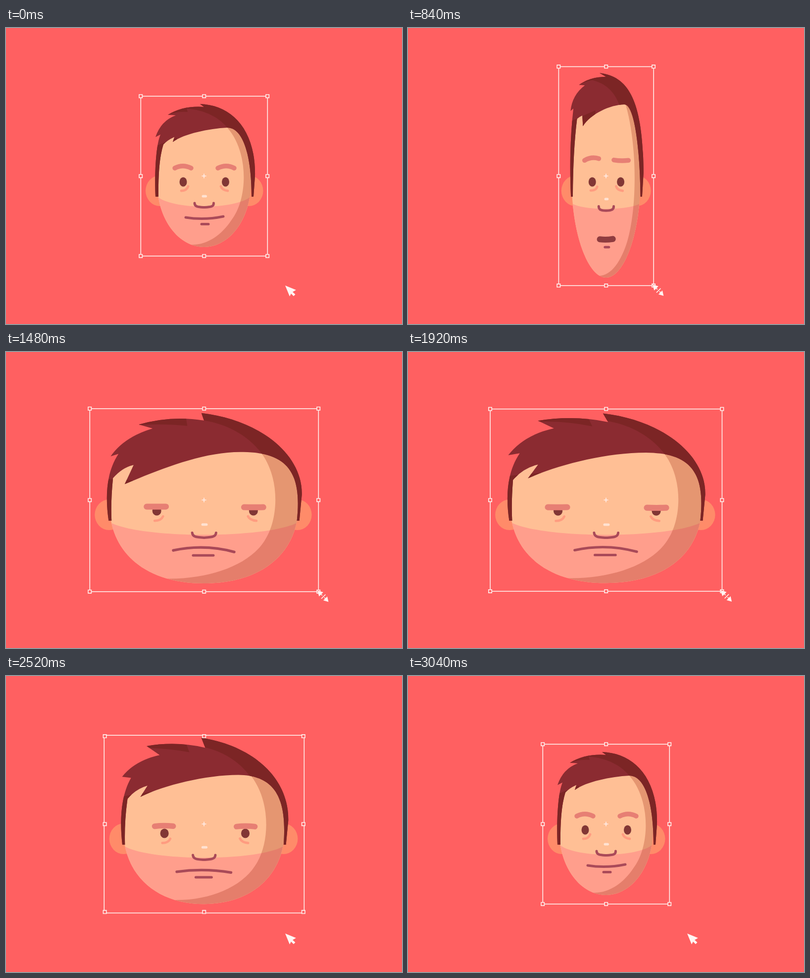
Animation, 800 px wide and 600 px high, one loop 3.08 s. Source, as an HTML page:

```html
<!DOCTYPE html>
<html lang="en">
<head>
<meta charset="utf-8">
<title>Face resize</title>
<style>
  html, body { margin: 0; width: 100%; height: 100%; overflow: hidden; background: #ff6061; }
  svg { display: block; width: 100vw; height: 100vh; }
  .line { fill: none; stroke-linecap: round; stroke-linejoin: round; }
  .feature { stroke: #aa4a59; stroke-width: 5; }
  .white { fill: none; stroke: #fff1ee; stroke-width: 1.6; }
  .solid { fill: #fff4f2; }
</style>
</head>
<body>
<svg viewBox="0 0 800 600">
  <defs>
    <clipPath id="inFace"><path class="face"/></clipPath>
    <clipPath id="inHair"><path class="hair"/></clipPath>
  </defs>
  <rect width="800" height="600" fill="#ff6061"/>
  <g fill="#ff8b69">
    <ellipse class="earL" cy="330" rx="29" ry="31"/>
    <ellipse class="earR" cy="330" rx="29" ry="31"/>
  </g>
  <path class="face" fill="#ffbf95"/>
  <g clip-path="url(#inFace)">
    <path class="beard" fill="#ff9e8c"/>
    <path class="shade" fill="#a8361f" fill-opacity=".3"/>
  </g>
  <path class="bags line" stroke="#ff9c80" stroke-width="4.8"/>
  <g fill="#823735">
    <ellipse class="eyeL eye"/>
    <ellipse class="eyeR eye"/>
  </g>
  <path class="brows line" stroke="#e77f74"/>
  <path class="glint line" stroke="#ffe2d2" stroke-width="5"/>
  <path class="nose line feature"/>
  <path class="mouth line"/>
  <path class="chin line feature"/>
  <path class="hair" fill="#8b2b31"/>
  <g clip-path="url(#inHair)" fill="#7c2525">
    <path class="crown"/>
    <path class="tuft"/>
    <path class="side"/>
  </g>
  <rect id="box" class="white"/>
  <g id="handles"></g>
  <path class="white" d="M395.5 300h9M400 295.5v9"/>
  <g id="cursor">
    <path id="arrow" class="solid" d="M0 0L22 9 15 13 20.5 18 17 21.5 12 16.5 9 22Z"/>
    <g id="resize">
      <path class="solid" d="M0 0L12 3.5 3.5 12ZM22.5 23L20 12 12 20Z"/>
      <path class="white" d="M8 16.5L16.5 8M7 7L10 10M14 14L17 17"/>
    </g>
  </g>
</svg>
<script>
const LOOP = 3080;
const $ = id => document.getElementById(id);

const face = (l, yb, xb, b, yt, xt, t) => {
  const r = 800 - l;
  return `M${l} 310C${l} ${yb} ${xb} ${b} 400 ${b}C${800 - xb} ${b} ${r} ${yb} ${r} 310` +
    `C${r} ${yt} ${800 - xt} ${t} 400 ${t}C${xt} ${t} ${l} ${yt} ${l} 310Z`;
};
const beard = (l, y, x, dip) =>
  `M${l} ${y}C${x} ${dip} ${800 - x} ${dip} ${800 - l} ${y}L${800 - l} 600L${l} 600Z`;
const shade = (curve, x) => `M${curve}L${x} 600L700 600L700 100Z`;
const crown = (x, y, curve, endX) => `M${x} ${y}C${curve}L${endX} 350L700 350L700 0L${x} 0Z`;
const side = (x, y, x2, y2) => `M${x} ${y}L${x2} ${y2}L${x2} 350L${x} 350Z`;

// Poses: normal, tall, wide, rebound (hair thrown up), drop (hair thrown down).
// A value left out is taken from the pose given here.
const fallback = [0, 0, 0, 0, 2];

// Each entry: class, attribute, then its value in the poses.
const parts = [
  ['earL', 'cx', '311', '350', '208', '308'],
  ['earR', 'cx', '490.5', '450', '589', '493'],
  ['face', 'd',
    face(305, 390, 350, 444, 200, 320, 195),
    face(341, 430, 370, 531, 140, 352, 120),
    face(209, 405, 282, 466, 210, 240, 195),
    face(303, 390, 349, 447, 195, 319, 188)],
  ['beard', 'd', beard(305, 341, 335, 369), beard(341, 361, 360, 371),
    beard(209, 344, 270, 379), beard(303, 342, 333, 370)],
  ['shade', 'd',
    shade('447 202C490 250 490 345 455 390C435 420 405 442 370 439', 370),
    shade('437 137C452 230 453 370 438 450C430 490 415 527 390 528', 390),
    shade('517 209C555 260 551 340 522 381C490 431 405 460 315 456', 315),
    shade('445 195C491 248 492 346 456 392C435 422 405 445 370 442', 370)],
  ['bags', 'd',
    'M354 330Q365 330 368 321M434 321Q437 329 448 330',
    'M375 329Q386 330 388 322M415 321Q417 329 428 330',
    'M300 342Q313 342 317 333M489 333Q493 341 506 342',
    'M353 330Q364 330 367 322M434 321Q437 329 449 330'],
  ['eyeL', 'cx', '358', '378', '304.5', '357'],
  ['eyeR', 'cx', '443.5', '424', '500', '444.5'],
  ['eye', 'cy', '312', '312', '322'],
  ['eye', 'rx', '7.5', '7.5', '9'],
  ['brows', 'd',
    'M341 284Q357 275.5 374 284M428 284Q445 275.5 461 284',
    'M363 262Q376 254 390 257M411 261Q425 268 439 262',
    'M284 314Q303 314 323 314M481 315Q500 315 520 315',
    'M339 283Q356 275 373 283M429 283Q446 275 462 283'],
  ['brows', 'stroke-width', '9.5', '9.5', '12'],
  ['glint', 'd', 'M398 341L403.5 341', 'M399.5 349L402.5 349', 'M397 349.5L405 349.5'],
  ['nose', 'd',
    'M381 355C381 363 390 363 400 363.5C411 363 420 363 419.5 355',
    'M387 364C387 372 393 373 400 373C407 373 414 372 414 364',
    'M376 366C377 375 385 375 400 376C414 375 424 375 424.5 366'],
  ['nose', 'stroke-width', '5', '5', '6'],
  ['mouth', 'd', 'M363 384Q400 390 439 382', 'M397.5 446Q400 446 403.5 446',
    'M337 400Q400 387 462 403', 'M362 385Q400 391 439 383'],
  ['mouth', 'stroke-width', '5', '15', '5'],
  ['mouth', 'stroke', 'rgb(170,74,89)', 'rgb(132,55,53)', 'rgb(170,74,89)'],
  ['chin', 'd', 'M395 397.5L409 397.5', 'M399 463L404.5 463', 'M378 410L419 410', 'M396 399L407 399'],
  ['hair', 'd',
    'M302 342C300 300 302 240 312 216L302 221Q313 188 343 177L327 176Q358 157 400 160L392 154' +
      'C455 156 505 205 503 300L500 342L496 342C496 255 478 202 447 202' +
      'C410 204 360 214 337 231L340 221Q325 228 318 236Q307 270 308 342Z',
    'M340 342C337 270 338 210 343 142L339 147Q339 115 363 92L353 91Q370 76 400 74L385 66' +
      'C450 75 462 140 465 290L462 342L459 342C458 260 452 136 433 136' +
      'C408 136 372 158 360 186L357 160Q354 161 351 163Q344 240 343 342Z',
    'M207 342C200 295 202 245 228 207L205 211Q236 170 296 157L264 142Q335 130 404 144L394 127' +
      'C510 140 600 208 598 290L593 342L588 342C598 248 572 206 480 205' +
      'C400 205 305 229 245 256L265 229Q235 236 215 260Q211 305 213 342Z',
    'M301 342C299 290 302 240 311 211L304 196Q318 180 344 174L331 151Q362 143 399 155L396 130' +
      'C440 145 505 185 505 300L501 342L497 342C496 250 480 196 445 195' +
      'C410 196 360 206 335 222L336 211Q325 218 318 228Q305 270 305 342Z',
    'M207 342C200 295 202 245 227 209L211 214Q238 175 296 158L268 150Q335 131 400 142L395 127' +
      'C510 140 600 208 598 290L593 342L588 342C598 248 572 206 480 205' +
      'C400 203 310 240 240 269L258 231Q235 236 216 258Q211 305 213 342Z'],
  ['crown', 'd',
    crown(362, 163, '405 166 432 183 448 203', 448),
    crown(368, 81, '400 88 413 112 419 138', 419),
    crown(393, 141, '440 146 490 170 519 211', 519),
    crown(395, 155, '412 164 428 180 438 197', 438)],
  ['tuft', 'd',
    'M327 176Q345 160 364 160L367 170Q345 168 327 177Z',
    'M353 91Q362 80 372 76L376 80Q366 82 353 92Z',
    'M264 142Q315 130 363 134L372 153Q320 142 264 144Z',
    'M331 151Q345 144 363 144L366 165Q350 164 333 158Z',
    'M268 149Q315 130 363 134L366 153Q320 148 268 151Z'],
  ['side', 'd', side(298, 241, 345, 222), side(334, 171, 392, 145),
    side(195, 253, 275, 245), side(297, 233, 342, 214), side(195, 259, 255, 262)],
].map(([cls, attr, ...poses]) => ({
  attr,
  els: [...document.querySelectorAll('.' + cls)],
  form: poses[0],
  nums: fallback.map((other, i) => (poses[i] || poses[other]).match(/-?[\d.]+/g).map(Number)),
}));

// Half sizes of the frame and of its handles in the same poses.
const frameSize = [[128, 162], [83, 246], [231.5, 182.5], [132.5, 168], [231.5, 182.5]];
const handleSize = frameSize.with(3, frameSize[0]);

// Time and pose weights.
const keys = [
  [0, 1, 0, 0, 0, 0],
  [640, 1, 0, 0, 0, 0],
  [960, -.025, 1.025, 0, 0, 0],
  [1120, 0, 1, 0, 0, 0],
  [1200, 0, 1, 0, 0, 0],
  [1480, -.0425, .033, 0, 0, 1.0095],
  [1620, -.04, 0, 1.04, 0, 0],
  [1800, -.08, .028, 1.052, 0, 0],
  [2100, 0, 0, 1, 0, 0],
  [2320, 0, 0, 1, 0, 0],
  [2420, -.084, .028, 1.056, 0, 0],
  [2680, 0, 0, 0, 1, 0],
  [2840, 1.12, 0, 0, -.12, 0],
  [2980, 1, 0, 0, 0, 0],
  [LOOP, 1, 0, 0, 0, 0],
];

const clamp = x => Math.min(1, Math.max(0, x));
const lerp = (a, b, k) => a + (b - a) * k;
const sine = x => (1 - Math.cos(Math.PI * x)) / 2;
const ease = (t, from, to) => {
  const x = clamp((t - from) / (to - from));
  return x < .5 ? 4 * x ** 3 : 1 - 4 * (1 - x) ** 3;
};

function weightsAt(t) {
  const i = keys.findIndex(k => k[0] > t);
  const [from, ...a] = keys[i - 1];
  const [to, ...b] = keys[i];
  const k = sine((t - from) / (to - from));
  return a.map((v, n) => lerp(v, b[n], k));
}

const blend = (rows, w, n) => w.reduce((sum, k, i) => sum + k * rows[i][n], 0);

function mix({ form, nums }, w) {
  let n = 0;
  return form.replace(/-?[\d.]+/g, () => blend(nums, w, n++).toFixed(2));
}

const spots = [];
for (const x of [-1, 0, 1]) for (const y of [-1, 0, 1]) {
  if (!x && !y) continue;
  const el = document.createElementNS('http://www.w3.org/2000/svg', 'path');
  el.setAttribute('d', 'M-3.2-3.2h6.4v6.4h-6.4Z');
  el.setAttribute('class', 'white');
  el.style.fill = '#ff6061';
  $('handles').append(el);
  spots.push({ el, x, y });
}

const eyes = document.querySelectorAll('.eye');
const set = (el, attrs) => { for (const k in attrs) el.setAttribute(k, attrs[k]); };

function draw(t) {
  const w = weightsAt(t);
  for (const part of parts) {
    const value = mix(part, w);
    for (const el of part.els) el.setAttribute(part.attr, value);
  }

  const blink = 1 - .88 * sine(clamp(1 - Math.abs(t - 320) / 100));
  for (const el of eyes) el.setAttribute('ry', 9.5 * blink);

  const [bw, bh] = [0, 1].map(n => blend(frameSize, w, n));
  set($('box'), { x: 400.3 - bw, y: 300.3 - bh, width: 2 * bw, height: 2 * bh });
  const [hw, hh] = [0, 1].map(n => blend(handleSize, w, n));
  for (const { el, x, y } of spots) {
    el.setAttribute('transform', `translate(${400.2 + x * hw} ${300.2 + y * hh})`);
  }

  // The pointer takes hold of the lower right corner, then lets go.
  const grip = t < 1000 ? ease(t, 80, 560) : 1 - ease(t, 1840, 2480);
  const cx = lerp(564, 398 + hw, grip), cy = lerp(522, 298 + hh, grip);
  $('cursor').setAttribute('transform', `translate(${cx} ${cy})`);
  const held = grip > .97;
  $('arrow').style.display = held ? 'none' : '';
  $('resize').style.display = held ? '' : 'none';
}

const start = performance.now();
function tick() {
  draw((performance.now() - start) % LOOP);
  requestAnimationFrame(tick);
}
tick();
</script>
</body>
</html>
```
